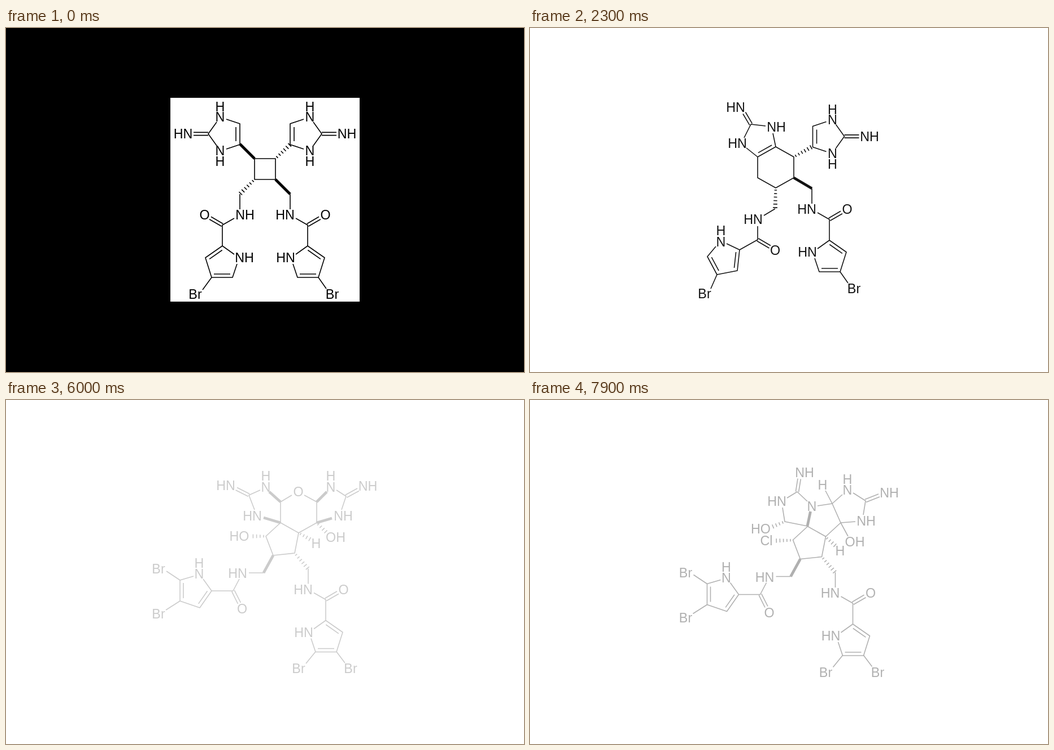
These frames come from a looping animation (917 by 611 pixels, 8 s). An HTML page:

```html
<!DOCTYPE html>
<html lang="en">
<head>
<meta charset="utf-8">
<title>Molecules</title>
<style>
  html, body { margin: 0; width: 100%; height: 100%; overflow: hidden; background: #fff; }
  svg { display: block; width: 100vw; height: 100vh; }
  path { fill: none; stroke: #000; stroke-width: 1.6; stroke-linejoin: round; }
  .bold { stroke-width: 4.8; }
  text { font: 23.3px "Liberation Sans", Arial, sans-serif; text-anchor: middle; fill: #000; }
</style>
</head>
<body>
<svg id="stage" viewBox="0 0 917 611">
  <rect id="back" width="917" height="611"/>
  <rect id="panel" fill="#fff"/>
  <g id="ink"></g>
</svg>
<script>
const WIDTH = 917, STEP = 100, STEPS_EACH = 22, LOOP = 8000;

const path = (d, kind = "bond") => `<path class="${kind}" d="${d}"/>`;
const bold = d => path(d, "bold");

// Bars across the line from a ring atom, widening away from it.
function hash(x1, y1, x2, y2) {
  const length = Math.hypot(x2 - x1, y2 - y1);
  const ux = (x2 - x1) / length, uy = (y2 - y1) / length;
  let d = "";
  for (let s = 4; s < length - 1; s += 6.2) {
    const half = 2 + 2 * s / length;
    const x = x1 + ux * s, y = y1 + uy * s;
    d += `M${x - uy * half} ${y + ux * half}L${x + uy * half} ${y - ux * half}`;
  }
  return path(d);
}

// Labels are written as "TEXT x y", separated by commas; x and y are the centre.
const labels = (list, flip) => list.split(",").map(item => {
  const [name, x, y] = item.trim().split(" ");
  const shown = flip ? [...name].reverse().join("") : name;
  return `<text x="${flip ? WIDTH - x : x}" y="${+y + 8}">${shown}</text>`;
}).join("");

const move = (dx, dy, body) => `<g transform="translate(${dx} ${dy})">${body}</g>`;
const part = (d, names) => flip =>
  (flip ? `<g transform="translate(${WIDTH}) scale(-1 1)">${path(d)}</g>` : path(d)) + labels(names, flip);

const imidazole = part(
  "M527 215L503 207V170L527 162M510 201V176M544 167L559 188L544 209M559 185.4H585M559 190.6H585",
  "N 538 158,H 538 140,N 538 218,H 538 237,NH 603.5 188");

const amidePyrrole = part(
  "M503 295V322M513 338L534 350V387L564 408L553 443H516L508 419M534 387L513 402" +
  "M532.7 347.7L554 335.3M535.3 352.3L557 339.8M534.3 394.5L556.9 410.3M549 437H520",
  "HN 494 332,O 565.5 332,HN 495 408");

// Cyclopentane with both side arms, shared by the last two molecules.
const lowerHalf =
  path("M486 218L460 242L473 276L511 272L518 236Z") +
  bold("M473 276L456 307") + hash(511, 272, 535, 300) +
  path("M456 307H430M413 318L402 339H364L343 369L308 357V320L332 313M364 339L349 318" +
    "M404.3 337.9L415.5 360M399.7 340.1L410.5 362M356.5 339.3L340.7 361.9M314 352V325" +
    "M308 320L284 304M308 357L283 373M548 447L531 468M585 447L600 467") +
  labels("HN 410 308,O 418 371,N 342 309,H 342 290,Br 270 300,Br 270 380,Br 518 477,Br 610 477") +
  move(32, 4.5, amidePyrrole());

const molecules = [
  {
    panel: [291, 124, 626, 486],
    body: imidazole() + imidazole(true) + amidePyrrole() + amidePyrrole(true) +
      path("M440 232H477V269H440ZM553 443L567 463M364 443L348 465") +
      bold("M414 206L440 232M477 269L503 295") +
      hash(477, 232, 503, 207) + hash(440, 269, 414, 295) +
      labels("Br 335 473,Br 577.5 473")
  },
  {
    panel: [292, 125, 624, 486],
    body: move(-2.5, 4.5, imidazole()) + move(-4, -10, amidePyrrole()) +
      path("M403 229L435 211L467 229V266L435 284L403 266ZM403.9 221.6L428.1 208" +
        "M388.7 172.4L377 152.5M393.3 169.6L381.5 149.5M417 174L391 171L379 195M430 187L435 211M383 213L403 229" +
        "M434 321L414 333M403 352V376L371 394L367 431L331 438L314 406L329 388M371 394L348 383" +
        "M404.3 373.7L426 386.5M401.7 378.3L423.5 391M364.6 398L361.5 426M334.2 431.2L321.4 407.2" +
        "M331 438L320 463M549 433L563 453") +
      bold("M467 266L499 285") +
      hash(467, 229, 499, 211) + hash(435, 284, 434, 321) +
      labels("HN 364 141,NH 436 176,HN 367 205,HN 395 340,O 434 395,N 338 380,H 338 360,Br 309 472,Br 573.5 463")
  },
  {
    panel: [253, 119, 664, 492],
    body: lowerHalf +
      path("M506 169L486 181V218M518 236L550 218V181L528 169" +
        "M431.2 166.7L409 155.5M428.8 171.3L406.5 160M450 160L430 169L440 195" +
        "M600.7 168.7L622 157M603.3 173.3L625 161.5M585 160L602 171L594 195") +
      bold("M466 163L486 181M456 209L486 218M550 181L568 163M550 218L577 210") +
      hash(550, 218, 570, 238) + hash(518, 236, 541, 249) + hash(460, 242, 432, 242) +
      labels("HN 389 152,N 460 155,H 460 135,O 517.5 163,HN 436 206,N 575 155,H 575 135," +
        "NH 640.5 153,NH 597 206,OH 583.5 244,H 549 255,HO 413 242")
  },
  {
    panel: [259, 112, 658, 498],
    body: move(5.5, 6.5, lowerHalf) +
      path("M447 191L451 216L491 224M455 174L473 163L491 180M470.4 162.6L474 139.5M475.6 163.4L479.3 140.3" +
        "M509 188L535 184L553 168M535 184L523 161M572 165L594 179L590 204M576 216L550 218L535 184" +
        "M593 176.6L617 167M595 181.4L619 172M523 243L550 218L563 242") +
      bold("M491 224L496.5 198") +
      hash(451, 216, 427, 226) + hash(465, 249, 432, 250) + hash(523, 243, 542, 260) +
      labels("NH 486 129,HN 437 180,N 499 189,HO 408.5 229,Cl 418.5 250,H 518 151,N 562 160,H 562 141," +
        "NH 636 165,NH 595 215,OH 575 252,H 549 268")
  }
];

const back = document.getElementById("back");
const panel = document.getElementById("panel");
const ink = document.getElementById("ink");
ink.innerHTML = molecules.map(m => `<g>${m.body}</g>`).join("");

function draw(time) {
  const step = Math.floor((time % LOOP) / STEP);
  const current = Math.floor(step / STEPS_EACH);
  const age = step % STEPS_EACH;
  const [left, top, right, bottom] = molecules[current].panel;

  // Each molecule opens on a black flash, then fades into white.
  back.setAttribute("fill", age ? "#fff" : "#000");
  panel.setAttribute("x", left);
  panel.setAttribute("y", top);
  panel.setAttribute("width", right - left);
  panel.setAttribute("height", bottom - top);
  [...ink.children].forEach((group, i) => group.setAttribute("display", i === current ? "inline" : "none"));
  ink.setAttribute("opacity", (1 - age / 29) ** 2);
}

function tick() {
  draw(performance.now());
  requestAnimationFrame(tick);
}
tick();
</script>
</body>
</html>
```
